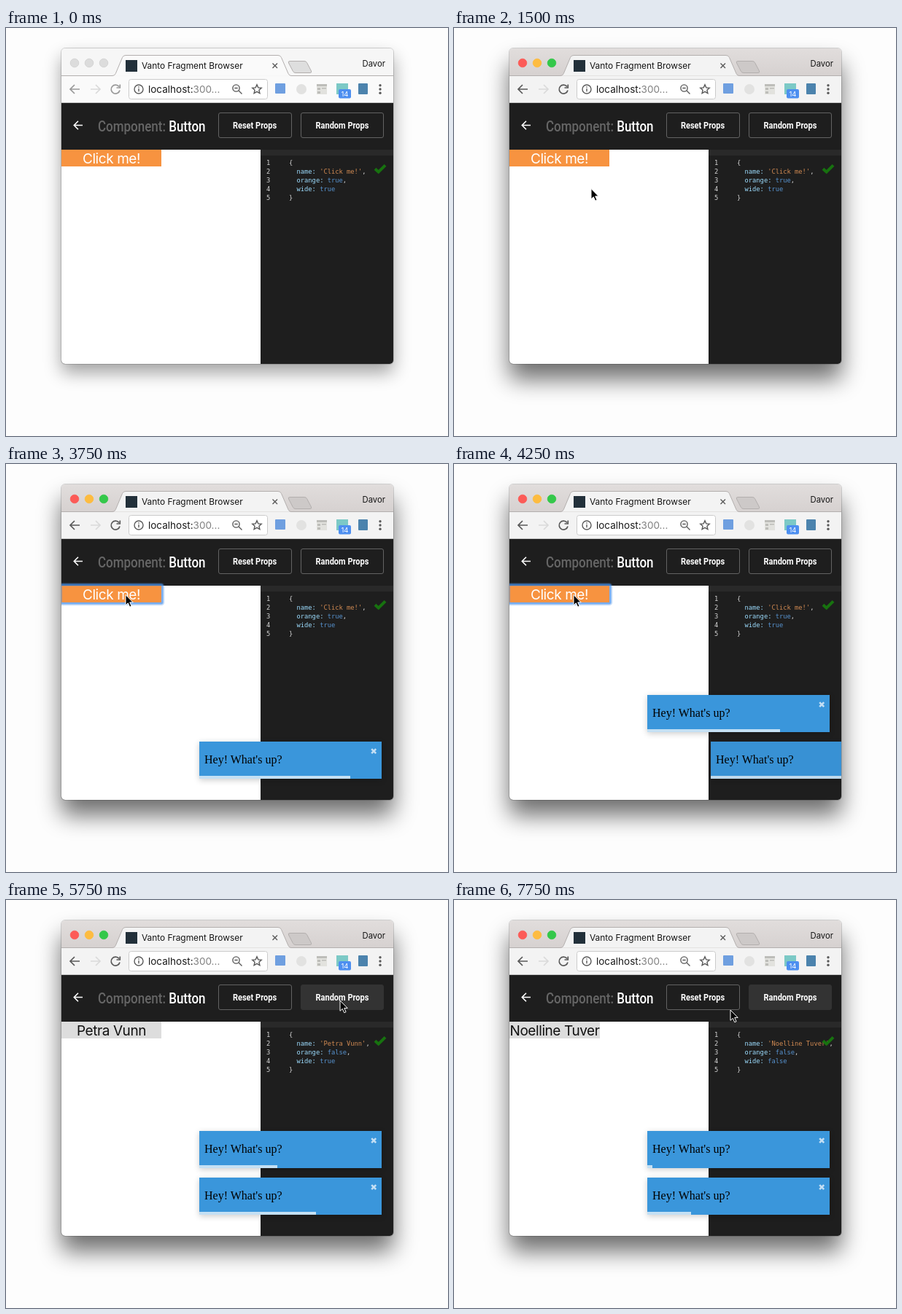
Animation of 606 by 560 pixels, one loop 8000 ms. Source, as an HTML page:

```html
<!DOCTYPE html>
<html lang="en">
<head>
<meta charset="utf-8">
<title>Component preview</title>
<style>
  html, body { margin: 0; width: 100%; height: 100%; overflow: hidden; background: #fdfdfd; }
  svg { display: block; width: 606px; height: 560px; }
  text { white-space: pre; }
  .ui { font-family: Inter, Roboto, sans-serif; }
  .head { font-family: Roboto, sans-serif; font-weight: 500; fill: #fff; }
  .code { font: 8.75px "DejaVu Sans Mono", "Liberation Mono", monospace; fill: #d4d4d4; }
  .key { fill: #9cdcfe; }
  .str { fill: #d18a52; }
  .bool { fill: #5793d0; }
  .line { fill: none; stroke: #5a5a5a; stroke-width: 1.7; }
  .toast text { font: 12.75px "Liberation Sans", Arial, sans-serif; fill: #fff; stroke: #fff; stroke-width: .25; }
</style>
</head>
<body>
<svg viewBox="0 0 606 560">
  <defs>
    <clipPath id="frame"><rect x="76" y="28" width="455" height="433" rx="5"/></clipPath>
    <filter id="deep" x="-30%" y="-30%" width="160%" height="160%"><feGaussianBlur stdDeviation="16"/></filter>
    <filter id="light" x="-30%" y="-30%" width="160%" height="160%"><feGaussianBlur stdDeviation="12"/></filter>
    <filter id="soft" x="-20%" y="-60%" width="140%" height="220%"><feGaussianBlur stdDeviation="4"/></filter>
    <linearGradient id="strip" x2="0" y2="1">
      <stop stop-color="#e1dddc"/><stop offset="1" stop-color="#d6d1d0"/>
    </linearGradient>
    <g id="toast">
      <rect y="2" width="250" height="51" opacity=".2" filter="url(#soft)"/>
      <rect width="250" height="51" fill="#3a96db"/>
      <text x="7" y="30">Hey! What's up?</text>
      <path d="M236.2 10.2l6 6m0-6l-6 6" stroke="#fff" stroke-width="2.6" opacity=".7"/>
    </g>
  </defs>

  <rect id="shadowOn" x="76" y="49" width="455" height="433" rx="5" opacity=".57" filter="url(#deep)"/>
  <rect id="shadowOff" x="76" y="40" width="455" height="433" rx="5" opacity=".36" filter="url(#light)"/>
  <rect x="75.5" y="27.5" width="456" height="434" rx="5.5" fill="none" stroke="#000" stroke-opacity=".16"/>

  <g clip-path="url(#frame)">
    <!-- tab strip -->
    <rect id="stripBg" x="76" y="28" width="455" height="38"/>
    <g id="lights" stroke-width=".8">
      <circle cx="94" cy="48" r="5.8"/><circle cx="114" cy="48" r="5.8"/><circle cx="134" cy="48" r="5.8"/>
    </g>
    <rect id="bar" x="76" y="66" width="455" height="37"/>
    <path id="tab" stroke="#b3afae" d="M76 65.5H146Q149 65.5 150.3 62.5L159.5 40.5Q160.7 37.5 164 37.5H373Q376.300 37.500 377.500 40.500L387 62.500Q388.300 65.500 391 65.500H531"/>
    <path id="plus" stroke="#b3afae" d="M389 45.500H409Q411.500 45.500 412.500 47.500L418.500 59Q419.500 61.500 417 61.500H397Q394.500 61.500 393.500 59.500L387.500 48Q386.500 45.500 389 45.500Z"/>
    <rect x="164" y="44" width="16" height="16" fill="#22303a"/>
    <text class="ui" x="186" y="56" font-size="11.9" fill="#151515">Vanto Fragment Browser</text>
    <path d="M365.500 48.500l6.500 6.500m0-6.500l-6.500 6.500" class="line" style="stroke-width:1.400"/>
    <text class="ui" x="520" y="53" font-size="11.3" text-anchor="end" fill="#151515">Davor</text>

    <!-- toolbar -->
    <path d="M76 102.500H531" stroke="#c4c4c4"/>
    <g id="nav" class="line">
      <path d="M101 84H88.500M94 78l-6 6 6 6"/>
      <path d="M155 80.500A6 6 0 1 0 156 85.500M156.300 77.500V82H151.500"/>
    </g>
    <path d="M116 84h12.500M123 78l6 6-6 6" fill="none" stroke="#dadada" stroke-width="1.7"/>
    <rect x="168.500" y="70.500" width="190" height="27" rx="3" fill="#fff" stroke="#cbcbcb"/>
    <g class="line" style="stroke-width:1.400">
      <circle cx="182" cy="84" r="6"/><path d="M182 83v4.300M182 80.300v1.500"/>
      <circle cx="315.500" cy="82.500" r="4.600"/><path d="M319 86l4.500 4.500M313.300 82.500h4.400"/>
      <path d="M344 77.800l1.800 4.100 4.400.4-3.300 2.900 1 4.400-3.900-2.300-3.900 2.300 1-4.400-3.300-2.900 4.400-.4Z"/>
    </g>
    <text class="ui" x="195" y="89" font-size="13.500" fill="#1a1a1a">localhost:<tspan fill="#808080">300...</tspan></text>
    <rect x="369" y="76" width="14" height="14" rx="1" fill="#6f9fe0"/>
    <circle cx="405" cy="84" r="7" fill="#e2e2e1"/>
    <g fill="#bdbdb9">
      <rect x="426" y="77" width="14" height="14" fill="#e2e2de"/>
      <path d="M426 77h14v3h-14zM427 82h4v3h-4zM427 87h4v3h-4zM433 82h6v1.500h-6z"/>
    </g>
    <rect x="453" y="76" width="16" height="15" fill="#7cc9c6"/>
    <rect x="456" y="84" width="17" height="12.500" rx="2" fill="#4d8ff0"/>
    <text class="ui" x="464.500" y="93.800" font-size="9.500" text-anchor="middle" fill="#fff">14</text>
    <rect x="483" y="76" width="13" height="15" rx="1" fill="#4c83ad"/>
    <g fill="#5a5a5a"><circle cx="513" cy="78.800" r="1.700"/><circle cx="513" cy="84" r="1.700"/><circle cx="513" cy="89.200" r="1.700"/></g>

    <!-- page -->
    <rect x="76" y="103" width="455" height="358" fill="#1e1e1e"/>
    <rect x="349" y="167" width="182" height="8" fill="#292929"/>
    <rect x="76" y="167" width="273" height="294" fill="#fff"/>
    <path d="M105 133.500H93.500M99 127.800l-5.700 5.700 5.700 5.700" fill="none" stroke="#fff" stroke-width="1.600"/>
    <rect x="291.500" y="116.500" width="100" height="34" rx="2.500" fill="none" stroke="#636363"/>
    <rect id="random" x="404.500" y="116.500" width="113" height="34" rx="2.500"/>
    <g class="head">
      <text transform="translate(126 142) scale(.85 1)" font-size="20" fill="#666">Component: <tspan fill="#fff">Button</tspan></text>
      <g font-size="13" font-weight="700" text-anchor="middle">
        <text transform="translate(341 138) scale(.85 1)">Reset Props</text>
        <text transform="translate(461 138) scale(.85 1)">Random Props</text>
      </g>
    </g>

    <rect id="button" x="76" y="167" height="23"/>
    <text id="label" class="ui" y="186" font-size="19" letter-spacing="-.42" text-anchor="middle"></text>
    <g id="ring" fill="none" stroke="#4b93ea">
      <rect x="75" y="165.500" width="140" height="26.500" rx="2" stroke-width="4.500" opacity=".3"/>
      <rect x="75" y="165.800" width="139.300" height="25.500" rx="1.500" stroke-width="2.400" opacity=".65"/>
    </g>

    <g class="code">
      <g id="numbers"></g>
      <text x="388" y="188">{</text>
      <text x="388" y="200">  <tspan class="key">name:</tspan> <tspan id="name" class="str"></tspan>,</text>
      <text x="388" y="212">  <tspan class="key">orange:</tspan> <tspan id="orange" class="bool"></tspan>,</text>
      <text x="388" y="224">  <tspan class="key">wide:</tspan> <tspan id="wide" class="bool"></tspan></text>
      <text x="388" y="236">}</text>
    </g>
    <path d="M506 193.300l4.700 4.300 9.300-9.300" fill="none" stroke="#17720f" stroke-width="4"/>

    <g class="toast" id="first"><use href="#toast"/><rect y="47" height="4" fill="#fff" opacity=".7"/></g>
    <g class="toast" id="second"><use href="#toast"/><rect y="47" height="4" fill="#fff" opacity=".7"/></g>
  </g>
  <path id="cursor" d="M0 0V14.300l3.300-3 2.400 5.400 2.400-1-2.400-5.300h4.500Z" stroke="#fff" stroke-width="1"/>
</svg>

<script>
const LOOP = 8000, STEP = 250;
const $ = id => document.getElementById(id);
const set = (el, attrs) => { for (const k in attrs) el.setAttribute(k, attrs[k]); };
const show = (el, on) => set(el, { visibility: on ? "visible" : "hidden" });
const easeOut = u => 1 - (1 - u) ** 3;
const smooth = u => u * u * (3 - 2 * u);

const props = [
  { at: 0, name: "Click me!", orange: true, wide: true },
  { at: 5500, name: "Petra Vunn", orange: false, wide: true },
  { at: 6500, name: "Noelline Tuver", orange: false, wide: false }
];
// time, x, y
const path = [
  [1000, 236, 300], [1500, 188, 220.500], [1750, 188, 220.500], [2000, 164, 179.500],
  [4250, 164, 179.500], [5250, 458, 138], [7250, 458, 138], [7750, 379, 151]
];
// share of the entrance, horizontal offset
const bounce = [[0, 3000], [.6, -25], [.75, 10], [.9, -5], [1, 0]];

// Value row of a keyframe list at position p
function along(keys, p, ease) {
  if (p <= keys[0][0]) return keys[0].slice(1);
  for (let i = 1; i < keys.length; i++) {
    const a = keys[i - 1], b = keys[i];
    if (p <= b[0]) {
      const u = ease((p - a[0]) / (b[0] - a[0]));
      return a.slice(1).map((v, j) => v + (b[j + 1] - v) * u);
    }
  }
  return keys[keys.length - 1].slice(1);
}

function drawToast(el, age, y) {
  show(el, age >= 0);
  if (age < 0) return;
  const p = age / 750, [dx] = along(bounce, p, easeOut);
  set(el, {
    transform: `translate(${265 + dx} ${y})`,
    opacity: easeOut(Math.min(1, p / .6))
  });
  set(el.lastElementChild, { width: Math.max(0, 250 - age / 20) });
}

function drawWindow(active) {
  show($("shadowOn"), active);
  show($("shadowOff"), !active);
  set($("stripBg"), { fill: active ? "url(#strip)" : "#f6f6f6" });
  set($("tab"), { fill: active ? "#f3f3f3" : "#fafafa" });
  set($("bar"), { fill: active ? "#f3f3f3" : "#fafafa" });
  set($("plus"), { fill: active ? "#cdc9c8" : "#dedede" });
  set($("nav"), { opacity: active ? 1 : .6 });
  const colors = active ? ["#fc5b57", "#fdbc40", "#34c84a"] : Array(3).fill("#dcdcdc");
  [...$("lights").children].forEach((c, i) => set(c, { fill: colors[i], stroke: active ? colors[i] : "#d0d0d0" }));
}

function drawButton(t) {
  const p = props.filter(s => s.at <= t).pop();
  const width = p.wide ? 137 : 124;
  set($("button"), { width, fill: p.orange ? "#f79340" : "#dddddd" });
  set($("label"), { x: 76 + width / 2, fill: p.orange ? "#fff" : "#111" });
  $("label").textContent = p.name;
  $("name").textContent = `'${p.name}'`;
  $("orange").textContent = p.orange;
  $("wide").textContent = p.wide;
  show($("ring"), t >= 2750 && t < 5500);
}

function draw(time) {
  const t = Math.floor(time % LOOP / STEP) * STEP;
  drawWindow(t >= 750);
  drawButton(t);
  const hot = t >= 5250;
  set($("random"), { fill: hot ? "#333" : "none", stroke: hot ? "#333" : "#636363" });
  drawToast($("first"), t - 2890, t < 3950 ? 381 : 317);
  drawToast($("second"), t - 3950, 381);
  const [x, y] = along(path, t, smooth);
  show($("cursor"), t >= 1000);
  set($("cursor"), { transform: `translate(${x} ${y})` });
}

for (let i = 1; i <= 5; i++) {
  const n = document.createElementNS("http://www.w3.org/2000/svg", "text");
  set(n, { x: 357, y: 176 + 12 * i });
  n.textContent = i;
  $("numbers").append(n);
}

const start = performance.now();
function tick() {
  draw(performance.now() - start);
  requestAnimationFrame(tick);
}
tick();
</script>
</body>
</html>
```
